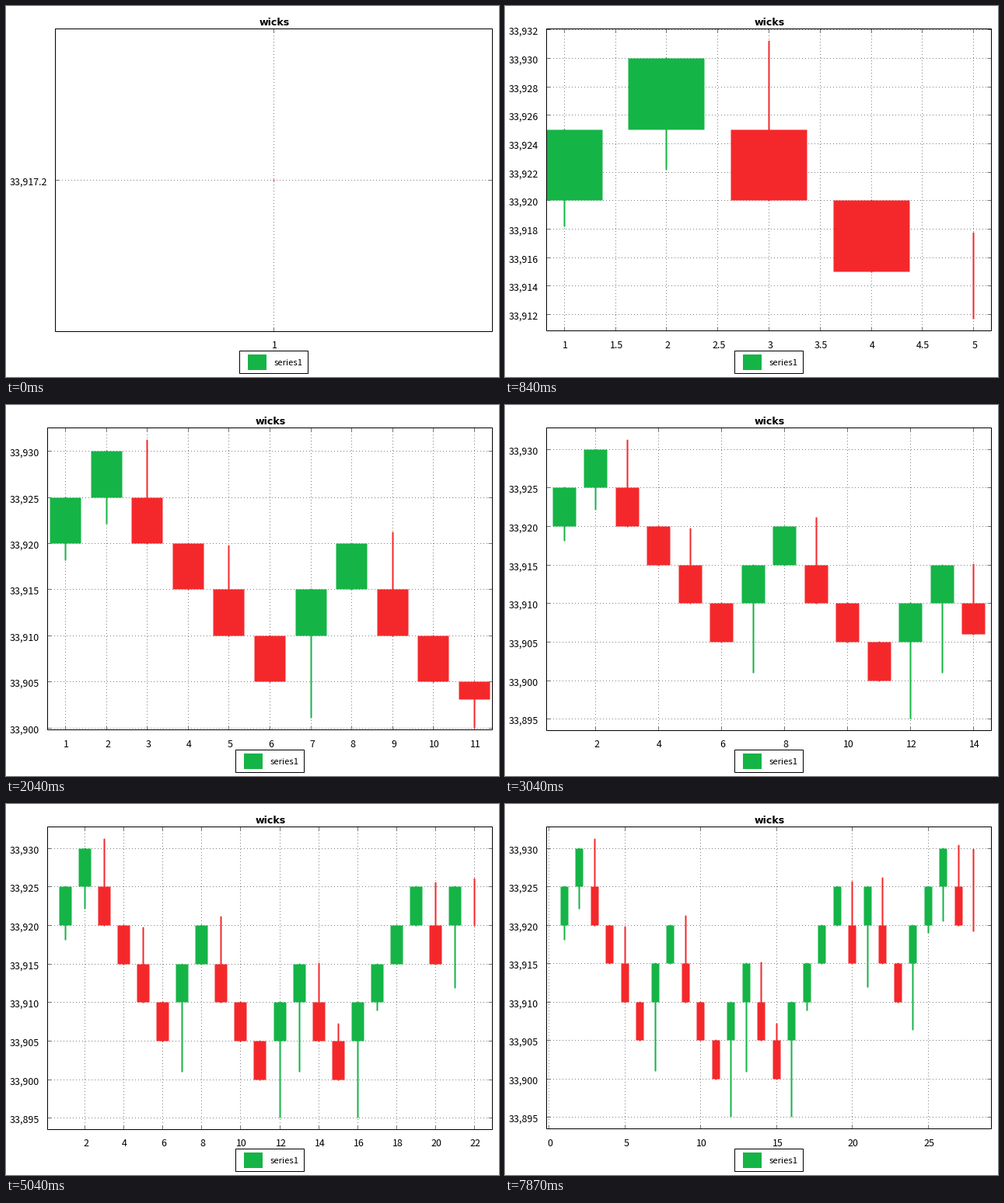
A matplotlib script for the animation above (8000 ms loop, 634 px wide and 478 px high).

```python
import math

import matplotlib.pyplot as plt
import numpy as np
from matplotlib.animation import FuncAnimation
from matplotlib.collections import LineCollection, PolyCollection
from matplotlib.patches import Rectangle

W, H, DPI = 634, 478, 100
LOOP_MS, INTERVAL = 8000, 40
PX = 72 / DPI
LABEL_FONT, TITLE_FONT = "Noto Sans CJK JP", "DejaVu Sans"
UP, DOWN = "#15b446", "#f4282b"
TOP, RIGHT = 29.5, 625.5
FILL = 0.92  # share of the plot area used by the data
PRICE_BASE, BRICK = 33900, 5
TICK_MS, FIRST_TICK, AXIS_LAG = 100, 40, 60
OPENING, START = 17.2, 18.2

# Bursts of trading: start ms, end ms, then the prices where the market turns.
# Speed is constant within a burst and the price rests between bursts.
BURSTS = [
    (0, 840, 26, 22.2, 31.23, 11.7, 17.7),
    (840, 1440, 19.75, 1.1),
    (1440, 2040, 21.15, 0.04, 3.1),
    (2460, 2540, -4.9, 10, 1.05, 13),
    (2700, 2840, 15.1, 12),
    (2960, 3040, 6),
    (3160, 3240, 5, 7.2, 0),
    (3560, 3640, -4.9),
    (3760, 3840, 11.6, 9, 10.6),
    (4100, 4440, 25.6),
    (4640, 4840, 12, 23),
    (4960, 5040, 26.1, 20),
    (5140, 5340, 16, 20.5),
    (5860, 5940, 15.05),
    (6140, 6240, 6.5),
    (6340, 6740, 19.7, 14, 17.6),
    (7040, 7840, 20.2, 19.1, 25.1, 20.6, 30.4, 19.3, 29.9, 23),
]


def price_path():
    """Times and prices on a 10 ms grid that also holds every turn."""
    times, prices = [], []
    for begin, end, *turns in BURSTS:
        stops = [prices[-1] if prices else START, *turns]
        travel = np.cumsum(np.abs(np.diff(stops, prepend=stops[0])))
        times.extend(begin + (end - begin) * travel / travel[-1])
        prices.extend(stops)
    grid = np.union1d(np.arange(0, LOOP_MS, 10), times)
    return grid, np.interp(grid, times, prices)


def replay():
    """Build bricks from the price; keep the chart as of each tick."""
    history = [(0, [(OPENING,) * 4], (OPENING, OPENING))]
    closed, spans = [], []
    base, top = 15, 20
    low = high = START
    for t, p in zip(*price_path()):
        while p >= top + BRICK or p <= base - BRICK:
            if p > top:
                start, end = top, top + BRICK
            else:
                start, end = base, base - BRICK
            closed.append((start, end, min(low, end), max(high, end)))
            base, top = sorted((start, end))
            low = high = end
        low, high = min(low, p), max(high, p)
        candles = closed + [(min(max(p, base), top), p, low, high)]
        span = (min(c[2] for c in candles), max(c[3] for c in candles))
        spans.append((t, span))
        if t % TICK_MS == FIRST_TICK:
            lagged = [s for when, s in spans if when <= t - AXIS_LAG]
            history.append((t, candles, lagged[-1] if lagged else span))
    return history


HISTORY = replay()


def center(v):
    """Middle of the pixel that holds v."""
    return math.floor(v) + 0.5


def tick_step(span, pixels, hint):
    raw = span / pixels * hint
    power = 10 ** math.floor(math.log10(raw))
    lead = raw / power
    nice = 10 if lead > 7.5 else 5 if lead > 3.5 else 2 if lead > 1.5 else 1
    return nice * power


def ticks(lo, hi, pixels, hint):
    if hi == lo:
        return [lo], 0
    step = tick_step(hi - lo, pixels, hint)
    pad = (hi - lo) * (1 - FILL) / 2 / FILL
    first = math.floor((lo - pad) / step) + 1
    last = math.ceil((hi + pad) / step) - 1
    return [i * step for i in range(first, last + 1)], step


def scale(lo, hi, start, end):
    """Map lo..hi to pixel centers in the padded span start..end."""
    if hi == lo:
        return lambda v: center((start + end) / 2)
    pad = (end - start) * (1 - FILL) / 2
    gain = (end - start) * FILL / (hi - lo)
    return lambda v: center(start + pad + (v - lo) * gain)


def number(v):
    return f"{v:,.1f}".removesuffix(".0")


fig = plt.figure(figsize=(W / DPI, H / DPI), dpi=DPI, facecolor="white")
ax = fig.add_axes([0, 0, 1, 1])
ax.set_xlim(0, W)
ax.set_ylim(H, 0)
ax.axis("off")


def text(x, y, s, size, font=LABEL_FONT, **kw):
    ax.text(x, y, s, fontsize=size * PX, family=font, color="black",
            va="baseline", **kw)


def lines(segments, colors, width, z, **kw):
    ax.add_collection(LineCollection(segments, colors=colors, snap=False,
                                     linewidths=width * PX, zorder=z, **kw),
                      autolim=False)


def box(x0, y0, x1, y1, z=4, **kw):
    ax.add_patch(Rectangle((x0, y0), x1 - x0, y1 - y0, zorder=z, snap=False,
                           **kw))


def draw_axes(left, bottom, x_ticks, y_ticks, y_labels, to_x, to_y):
    grid, marks = [], []
    for v, label in zip(y_ticks, y_labels):
        y = to_y(v)
        grid.append([(left + 0.5, y), (RIGHT, y)])
        marks += [[(left, y), (left + 5, y)], [(RIGHT - 5, y), (RIGHT, y)]]
        text(left - 10.5, y + 6, label, 12.4, ha="right")
    for v in x_ticks:
        x = to_x(v)
        grid.append([(x, TOP + 0.5), (x, bottom)])
        marks += [[(x, TOP), (x, TOP + 5)], [(x, bottom - 5), (x, bottom)]]
        text(x + 1.2, 440.6, number(v), 12.4, ha="center")
    lines(grid, "#808080", 1, 1, linestyles=[(0, (1, 3))])
    lines(marks, "#707070", 1, 1.5)
    box(left, TOP, RIGHT, bottom, 1.6, fill=False, ec="black", lw=PX)


def draw_candles(candles, left, half, to_x, to_y):
    bodies, wicks, colors = [], [], []
    for i, (start, end, low, high) in enumerate(candles, 1):
        x, y0, y1 = to_x(i), to_y(start), to_y(end)
        x0, x1 = max(center(x - half), left + 0.5), center(x + half)
        bodies.append([(x0, y0), (x1, y0), (x1, y1), (x0, y1)])
        wicks.append([(x, to_y(low) + 0.2), (x, to_y(high))])
        colors.append(UP if end > start else DOWN)
    lines(wicks, colors, 2, 2, capstyle="round")
    ax.add_collection(PolyCollection(bodies, facecolors=colors, snap=False,
                                     edgecolors="none", zorder=3),
                      autolim=False)


def draw_captions(shift):
    text(shift + 339.7, 24.5, "wicks", 12.6, TITLE_FONT, weight="bold",
         ha="center")
    box(shift + 295.5, 444.5, shift + 383.5, 473.5, fc="white", ec="black",
        lw=PX)
    box(shift + 306, 449, shift + 330, 469, 5, fc=UP, ec="none")
    text(shift + 339.7, 463.2, "series1", 11.3, ha="left", zorder=6)


def draw(frame):
    for artist in [*ax.texts, *ax.collections, *ax.patches]:
        artist.remove()
    now = frame * INTERVAL + 30
    _, candles, (lo, hi) = [s for s in HISTORY if s[0] <= now][-1]
    n = len(candles)

    y_ticks, _ = ticks(lo, hi, 358, 44)
    y_labels = [number(PRICE_BASE + v) for v in y_ticks]
    left = 63.5 if any("." in s for s in y_labels) else 53.5
    width = (RIGHT - left) * FILL
    x_ticks, x_step = ticks(1, n, width, 74)
    bottom = 419.5 if n == 1 or x_step == 2 else 418.5
    to_x = scale(1, n, left, RIGHT)
    to_y = scale(lo, hi, bottom, TOP)

    draw_axes(left, bottom, x_ticks, y_ticks, y_labels, to_x, to_y)
    draw_candles(candles, left, width / n / 2 - 4, to_x, to_y)
    draw_captions((left - 53.5) / 2)
    return []


anim = FuncAnimation(fig, draw, frames=LOOP_MS // INTERVAL, interval=INTERVAL,
                     init_func=lambda: [], repeat=True, repeat_delay=0,
                     blit=False)
plt.show()
```
